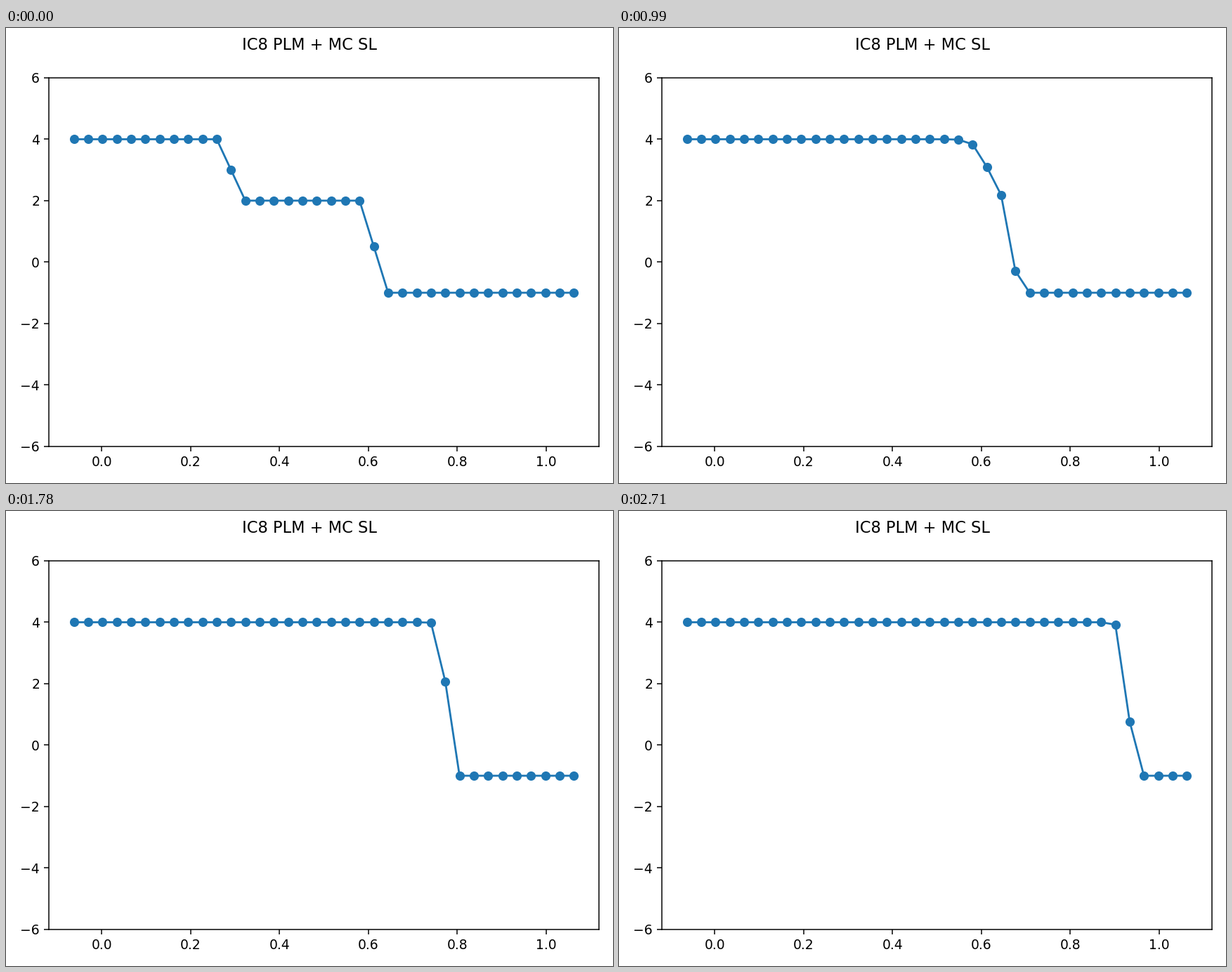
Write a matplotlib script that moves like this. It is 864x648 px and loops after 2780 ms.

```python
import numpy as np
import matplotlib.pyplot as plt
from matplotlib.animation import FuncAnimation

CELLS, GHOSTS = 32, 2
STEPS = 42
COURANT = 0.9
STEP_MS = 66          # time one solution stays on screen
TICK_MS = 20          # animation frame length
LOOP_MS = 2780


def flux(u):
    return u * u / 2


def godunov_flux(left, right):
    """Exact Riemann flux for Burgers' equation."""
    return np.maximum(flux(np.maximum(left, 0)), flux(np.minimum(right, 0)))


def advance(u):
    ratio = COURANT / np.abs(u).max()
    f = godunov_flux(u[:-1], u[1:])
    new = u.copy()
    new[1:-1] -= ratio * np.diff(f)
    return new


# Three plateaus; each jump starts inside one cell holding the mean value.
u = np.repeat([4, 3, 2, 0.5, -1], [11, 1, 9, 1, 14]).astype(float)
history = [u]
for _ in range(STEPS - 1):
    history.append(advance(history[-1]))

pad = GHOSTS / CELLS
x = np.linspace(-pad, 1 + pad, CELLS + 2 * GHOSTS)

fig, ax = plt.subplots(figsize=(6.4, 4.8), dpi=135)
fig.suptitle("IC8 PLM + MC SL")
line, = ax.plot(x, history[0], "o-", color="#1f77b4")
ax.set_ylim(-6, 6)
fig.tight_layout()


def update(tick):
    now = tick * TICK_MS + TICK_MS // 2
    step = min((now + 5) // STEP_MS, STEPS - 1)
    line.set_ydata(history[step])
    return line,


anim = FuncAnimation(fig, update, frames=LOOP_MS // TICK_MS,
                     interval=TICK_MS, repeat=True, repeat_delay=0)
plt.show()
```
